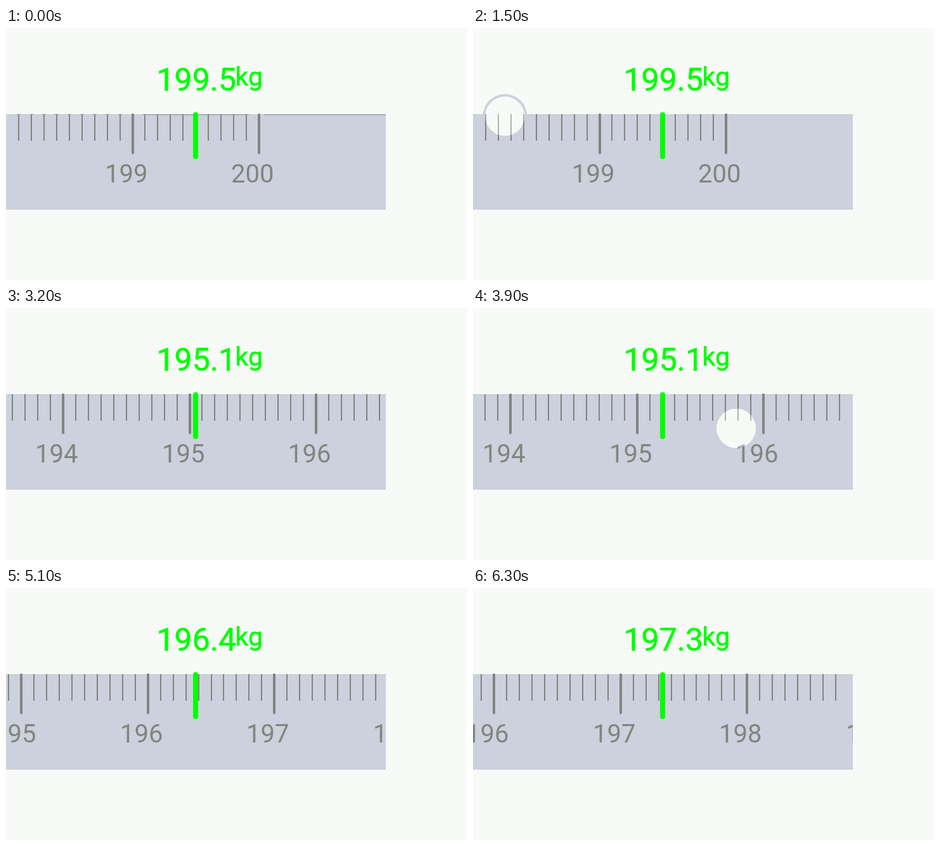
These frames come from a looping animation (727 by 398 pixels, 6.4 s). An HTML page with a canvas:

```html
<!DOCTYPE html>
<html lang="en">
<head>
<meta charset="utf-8">
<title>Weight ruler</title>
<style>
  html, body { margin: 0; width: 100%; height: 100%; overflow: hidden; background: #f8faf8; }
  canvas { display: block; }
</style>
</head>
<body>
<canvas id="stage" width="727" height="398"></canvas>
<script>
const ctx = document.getElementById('stage').getContext('2d');
const LOOP = 6400, STEP = 100, LABEL_LAG = 60;
const CENTER = 299.3, UNIT = 199.5, MAX = 200;
const RULER = { top: 136, right: 599, height: 151 };
const PAPER = '#f8faf8', PANEL = '#cdd0dd', INK = '#80867e', GREEN = '#00ff00';
const ROAM = { shown: 500, start: 900, end: 2000 };

// resting points of the scale: time and value under the needle
const stops = [
  [0, 199.5], [2000, 199.5], [2200, 200], [2400, 199.821], [3200, 195.049],
  [3600, 194.9], [4600, 196.3085], [4800, 196.3785], [5700, 196.3785], [6300, 197.3335]
];

const drags = [
  { start: 2200, end: 2600, from: [362, 166], to: [434, 162] },
  { start: 3700, end: 4100, from: [480, 185], to: [350, 195] },
  { start: 5700, end: 6200, from: [494, 180], to: [314, 261] }
];

const ease = p => p * p * (3 - 2 * p);
const mix = (a, b, p) => a + (b - a) * p;

function valueAt(t) {
  const i = stops.findIndex(s => s[0] > t);
  if (i < 0) return stops[stops.length - 1][1];
  const [t0, v0] = stops[i - 1], [t1, v1] = stops[i];
  return mix(v0, v1, ease((t - t0) / (t1 - t0)));
}

function touchAt(t) {
  if (t >= ROAM.shown && t < ROAM.end) {
    const angle = 2 * Math.PI * Math.max(0, t - ROAM.start) / (ROAM.end - ROAM.start);
    return [248 + 206 * Math.cos(angle), 187 + 82 * Math.sin(angle + 0.335)];
  }
  const drag = drags.find(d => t >= d.start && t <= d.end);
  if (!drag) return null;
  const p = ease((t - drag.start) / (drag.end - drag.start));
  return drag.from.map((v, i) => mix(v, drag.to[i], p));
}

function text(str, x, y, size, color, weight = 0) {
  ctx.font = `${size}px Roboto, sans-serif`;
  ctx.fillStyle = ctx.strokeStyle = color;
  ctx.fillText(str, x, y);
  if (weight) {
    ctx.lineWidth = weight;
    ctx.strokeText(str, x, y);
  }
}

function disc([x, y], r, color) {
  ctx.fillStyle = color;
  ctx.beginPath();
  ctx.arc(x, y, r, 0, Math.PI * 2);
  ctx.fill();
}

function drawPanel() {
  ctx.fillStyle = PANEL;
  ctx.fillRect(0, RULER.top, RULER.right, RULER.height);
  ctx.fillStyle = '#c6d6ce';
  ctx.fillRect(0, RULER.top, RULER.right, 1);
}

function drawTouch(point, resting) {
  disc(point, 35, PANEL);
  if (resting) disc(point, 33, '#b5dfbd');
  disc(point, 31, PAPER);
}

function drawScale(value) {
  ctx.save();
  ctx.beginPath();
  ctx.rect(0, 0, RULER.right, 398);
  ctx.clip();
  const first = Math.ceil((value - CENTER / UNIT) * 10);
  const last = Math.min(MAX * 10, first + 36);
  for (let n = first; n <= last; n++) {
    const x = CENTER + (n / 10 - value) * UNIT;
    if (x < 1) continue;
    ctx.fillStyle = INK;
    if (n % 10 === 0) {
      ctx.beginPath();
      ctx.roundRect(Math.round(x - 2), 135, 4, 64, 1.5);
      ctx.fill();
      text(String(n / 10), Math.round(x - 44), 244, 40, INK);
    } else if (x < 590) {
      ctx.fillRect(Math.round(x - 1), 136, 2, 42);
    }
  }
  ctx.restore();
}

function drawTopLine() {
  ctx.fillStyle = '#858a98';
  for (let x = 17; x < 190; x += 20) ctx.fillRect(x, 136, 6, 1);
  ctx.fillRect(216, 136.5, 167, 1);
  ctx.fillRect(407, 136.5, 192, 1);
}

function drawNeedle() {
  ctx.strokeStyle = GREEN;
  ctx.lineWidth = 8;
  ctx.lineCap = 'round';
  ctx.beginPath();
  ctx.moveTo(299, 137);
  ctx.lineTo(299, 203);
  ctx.stroke();
}

function draw(t) {
  ctx.fillStyle = PAPER;
  ctx.fillRect(0, 0, 727, 398);
  drawPanel();
  const touch = touchAt(t);
  if (touch) drawTouch(touch, t <= ROAM.start);
  drawScale(valueAt(t));
  if (touch) {
    // veil the ticks that show through the touch
    ctx.globalAlpha = 0.4;
    disc(touch, 31, PAPER);
    ctx.globalAlpha = 1;
  }
  if (t < STEP) drawTopLine();
  drawNeedle();
  const shown = valueAt(Math.max(0, t - LABEL_LAG));
  text(shown.toFixed(1), 237.5, 98.5, 50, GREEN, 0.6);
  text('kg', 361.5, 90.5, 41, GREEN, 0.6);
}

const start = performance.now();
function tick() {
  const t = Math.max(0, performance.now() - start) % LOOP;
  draw(Math.floor(t / STEP) * STEP);
  requestAnimationFrame(tick);
}
tick();
</script>
</body>
</html>
```
